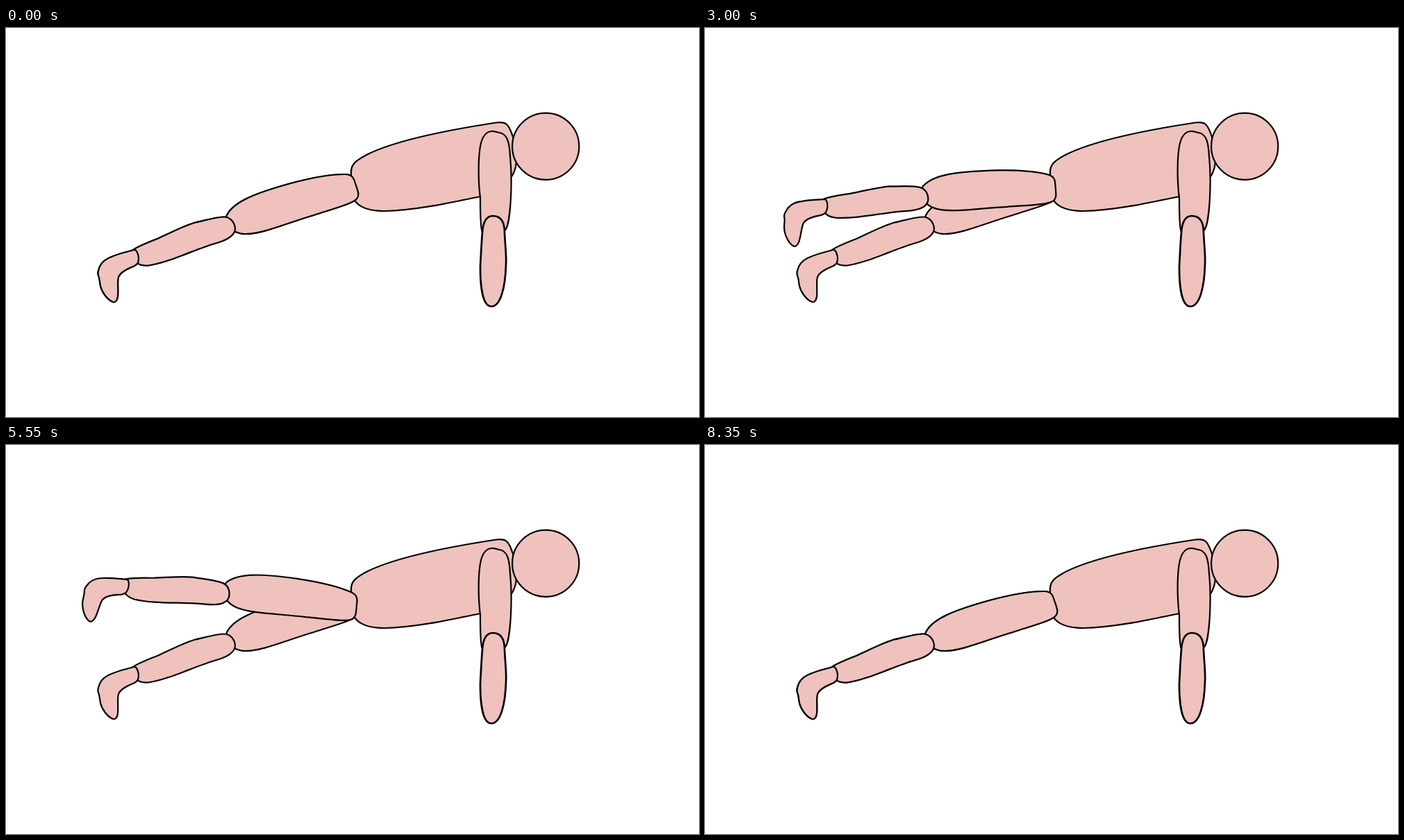
An HTML page that plays this animation: 998 px wide and 561 px high, repeating every 8400 ms.

```html
<!DOCTYPE html>
<html lang="en">
<head>
<meta charset="utf-8">
<title>Plank leg raise</title>
<style>
  html, body { margin: 0; width: 100%; height: 100%; overflow: hidden; background: #fff; }
  svg { display: block; width: 100%; height: 100%; }
</style>
</head>
<body>
<svg viewBox="0 0 998 561" fill="#efc2bd" stroke="#000" stroke-width="2.2" stroke-linejoin="round">
  <defs>
    <path id="thigh" d="M318 270C328 250 360 238 410 224C440 216 470 211 488 211C499 211 501 217 503 224C507 236 509 240 506 245C502 253 470 261 443 270C405 281 370 297 345 297C340 297 335 296 331 294C322 290 315 280 318 270Z"/>
    <path id="calf" d="M183 320C190 315 205 309 218 304C240 294 255 286 271 281C285 278 300 273 313 272.5C324 272 330 282 330 290C329 300 318 306 300 311C270 320 235 338 205 342.5C197 343 191 341 188 338C183 334 181 326 183 320Z"/>
    <path id="foot" d="M184 320C188 319 190 325 191 331C191 338 190 340 185 343C179 346 166 350 162 359C160 366 162 375 161 387C160 394 157 396 154 395C146 392 138 381 136 372C134 362 135 361 133 357C131 352 133 351 135 344C138 338 143 333 152 330C163 325 175 323 184 320Z"/>
  </defs>

  <use href="#thigh"/><use href="#calf"/><use href="#foot"/>

  <path d="M497 208C497 196 504 191 521 182C560 163 630 148 706 136.5C720 135 724 137 731 160C735 175 736 190 734 200C731 212 728 216 718 224C705 238 690 241 683 243C640 252 590 263 545 264C525 264 510 259 503 250C498 240 497 225 497 208Z"/>

  <g id="hip">
    <use href="#thigh"/>
    <g id="knee">
      <use href="#calf"/>
      <g id="ankle"><use href="#foot"/></g>
    </g>
  </g>

  <circle cx="777.2" cy="170.7" r="48.1"/>
  <path d="M681 190C682 170 685 151 698 149C702 148 706 150 711 151C722 153 725 165 726 185C728 205 728 225 727 245C726 265 723 290 718 292L686 294C683 290 683 260 683 245C681 230 680 215 681 190Z"/>
  <path stroke-width="2.7" d="M701 271C714 271 718 282 718 295C719 315 721 330 720 342C719 375 712 401.500 699 401.500C687 401.500 683 375 683 345C684 325 685 305 686 295C687 280 692 271 701 271Z"/>
</svg>
<script>
  const CYCLE = 4200, STEP = 50, LIFT = 26.1;
  const [hip, knee, ankle] = ["hip", "knee", "ankle"].map(id => document.getElementById(id));

  // Sine ease from 0 to 1 between two times
  function ease(t, from, to) {
    const u = Math.min(1, Math.max(0, (t - from) / (to - from)));
    return (1 - Math.cos(Math.PI * u)) / 2;
  }

  function turn(joint, angle, x, y) {
    joint.setAttribute("transform", `rotate(${angle} ${x} ${y})`);
  }

  const start = performance.now();

  function draw() {
    const elapsed = performance.now() - start;
    const t = Math.floor(elapsed / STEP) * STEP % CYCLE;
    const angle = LIFT * (ease(t, 0, 1700) - ease(t, 2020, 4040));
    turn(hip, angle, 490, 232);
    turn(knee, -0.05 * angle, 318, 288);
    turn(ankle, -0.09 * angle, 188, 331);
    requestAnimationFrame(draw);
  }
  draw();
</script>
</body>
</html>
```
